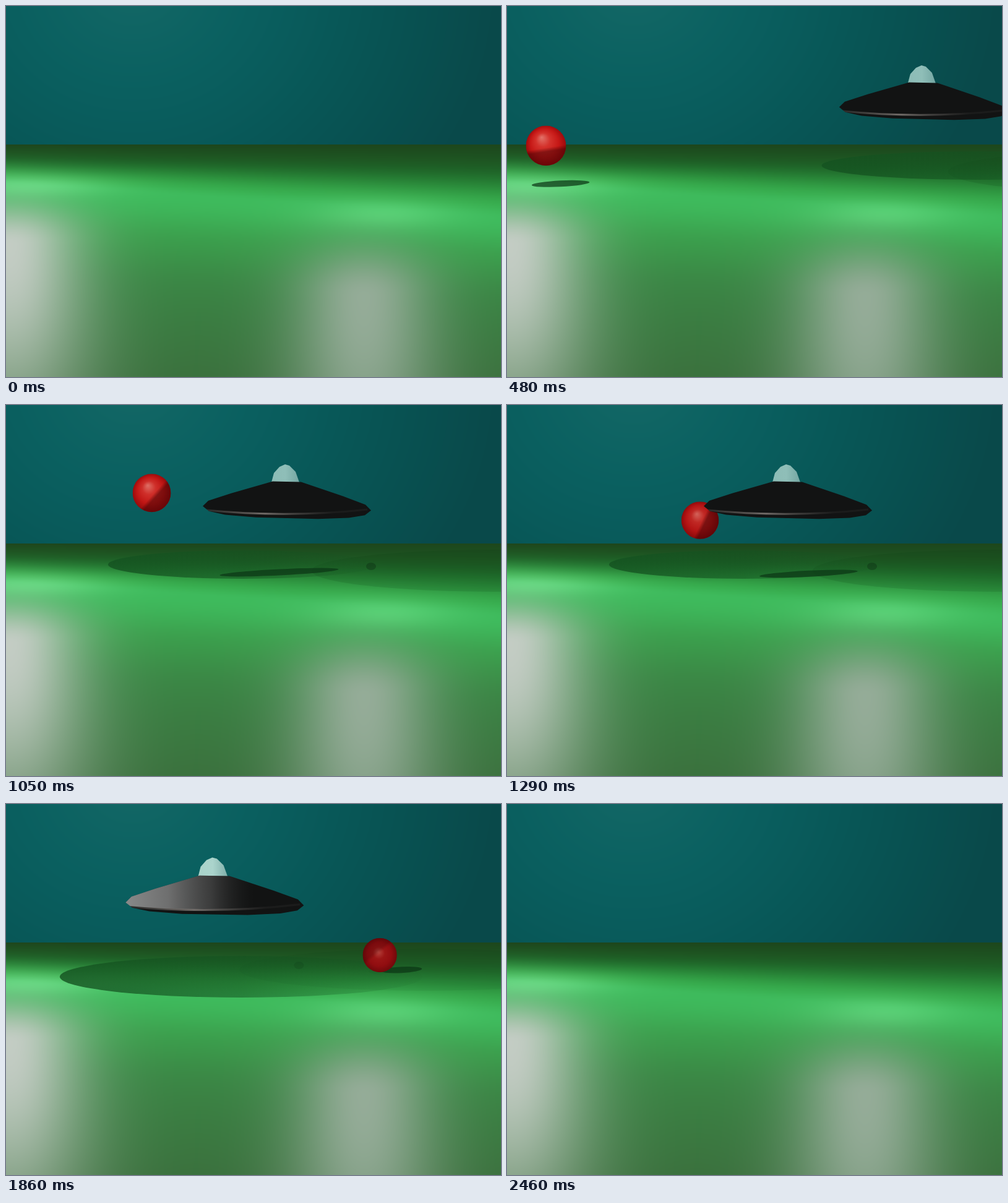
These frames come from a looping animation (800x600 px, 2550 ms). An HTML page with a canvas:

```html
<!DOCTYPE html>
<html lang="en">
<head>
<meta charset="utf-8">
<title>Saucer and ball</title>
<style>
html, body { margin: 0; width: 100%; height: 100%; overflow: hidden; background: #0a5f5f; }
canvas { display: block; width: 800px; height: 600px; }
</style>
</head>
<body>
<canvas id="stage" width="800" height="600"></canvas>
<script>
const W = 800, H = 600, HORIZON = 224;
const LOOP = 2550, FIRST_HOLD = 120, STEP = 30, LAST_FRAME = 79;
const ctx = document.getElementById('stage').getContext('2d');

const clamp = v => Math.max(0, Math.min(1, v));
const lerp = (a, b, t) => a + (b - a) * t;
const smooth = (a, b, v) => { const t = clamp((v - a) / (b - a)); return t * t * (3 - 2 * t); };
const bell = (v, mid, width) => Math.exp(-(((v - mid) / width) ** 2));

// Smooth curve through points [position, values...] that never overshoots
function sample(points, at) {
  const last = points.length - 1;
  let i = 0;
  while (i < last - 1 && at > points[i + 1][0]) i++;
  const a = points[i], b = points[i + 1], span = b[0] - a[0];
  const t = clamp((at - a[0]) / span), u = 1 - t;
  const rate = (k, c) => (points[k + 1][c] - points[k][c]) / (points[k + 1][0] - points[k][0]);
  const slope = (k, c) => {
    if (k === 0) return rate(0, c);
    if (k === last) return rate(k - 1, c);
    const p = rate(k - 1, c), q = rate(k, c);
    return p * q > 0 ? 2 * p * q / (p + q) : 0;
  };
  return a.slice(1).map((v, n) => {
    const c = n + 1;
    return v * (1 + 2 * t) * u * u + b[c] * t * t * (3 - 2 * t)
      + span * t * u * (slope(i, c) * u - slope(i + 1, c) * t);
  });
}

// Frame, x, height above the floor
const bounces = [
  [0, -70, 150], [13, 63, 49], [23, 164, 0], [35.5, 265, 156], [40, 312, 79],
  [45.5, 408, 4], [53, 533, 18], [66, 680, 0], [79, 835, 115]
];

function ballAt(frame) {
  const [x, height] = sample(bounces, frame);
  const r = 33 - 0.0088 * x, ground = 136 + 5 * r;
  const flip = 2 * smooth(41, 50, frame);
  return { x, y: ground - 0.72 * r - height, r, height, ground, angle: -0.15 - 0.036 * (frame - 13) - flip };
}

function saucerAt(frame) {
  const away = Math.max(0, frame - 51) / 15;
  const arriving = 480 * (1 - smooth(-1.4, 25.8, frame));
  const hit = bell(frame, 51, 3.5);
  return {
    x: 454 + arriving + 6 * hit - 319 * away ** 1.6,
    y: 168 - 2 * hit - 10 * away,
    turn: -0.25 * hit - 0.015 * clamp(away),
    scale: 1 + 0.11 * away,
    light: smooth(0, 1, away),
    shadow: {
      x: 382 + 1.72 * arriving - 42 * away ** 5,
      y: 258 + 40 * away,
      rx: 217 + 0.15 * arriving + 143 * away,
      ry: 23 + 20 * away
    }
  };
}

const skyColors = [[0, 20, 104, 102], [200, 10, 95, 95], [400, 8, 84, 84], [590, 9, 73, 74]];
const floorColors = [
  [0, 29, 70, 28], [0.3, 30, 93, 37], [0.8, 55, 172, 78], [1, 62, 186, 92],
  [1.25, 59, 157, 76], [1.5, 58, 133, 68], [2, 57, 112, 60]
];

function fog(x, y, cx, cy, spread, above, below) {
  const dy = y - cy;
  return 0.95 * bell(x, cx, spread + Math.max(0, dy) * 0.1) * bell(dy, 0, dy < 0 ? above : below);
}

function floorColor(x, y) {
  const ridge = 287 + 0.07 * x;
  const depth = y < ridge ? (y - HORIZON) / (ridge - HORIZON) : 1 + (y - ridge) / (H - ridge);
  const glow = 28 * (bell(x, 40, 130) * bell(y, 290, 18) + 0.8 * bell(x, 610, 110) * bell(y, 336, 25));
  const leftFog = fog(x, y, 5, 385, 118, 68, 300), rightFog = fog(x, y, 578, 470, 112, 82, 340);
  const leftGrey = [202, 207, 202], rightGrey = [153, 174, 156];
  return sample(floorColors, depth)
    .map((v, c) => lerp(lerp(v + glow, leftGrey[c], leftFog), rightGrey[c], rightFog));
}

function paintBackdrop() {
  const canvas = document.createElement('canvas');
  canvas.width = W;
  canvas.height = H;
  const c = canvas.getContext('2d'), image = c.createImageData(W, H);
  for (let y = 0, i = 0; y < H; y++) {
    for (let x = 0; x < W; x++, i += 4) {
      const rgb = y < HORIZON
        ? sample(skyColors, Math.hypot(x - 205, (y + 40) * 1.1))
        : floorColor(x, y);
      for (let k = 0; k < 3; k++) image.data[i + k] = rgb[k];
      image.data[i + 3] = 255;
    }
  }
  c.putImageData(image, 0, 0);
  return canvas;
}
const backdrop = paintBackdrop();

// Spreads the colours evenly along the gradient
function shade(gradient, ...colors) {
  colors.forEach((color, i) => gradient.addColorStop(i / (colors.length - 1), color));
  return gradient;
}
const mix = (a, b, t) => `rgb(${a.map((v, i) => Math.round(lerp(v, b[i], t)))})`;

function ellipse(x, y, rx, ry, fill, angle = 0) {
  ctx.beginPath();
  ctx.ellipse(x, y, rx, ry, angle, 0, Math.PI * 2);
  ctx.fillStyle = fill;
  ctx.fill();
}

function polygon(points, fill) {
  ctx.beginPath();
  points.forEach(([x, y]) => ctx.lineTo(x, y));
  ctx.closePath();
  ctx.fillStyle = fill;
  ctx.fill();
}

function drawShadows(ball, saucer, frame) {
  const { x, r, height, ground } = ball, s = saucer.shadow, dim = 1 - saucer.light;
  ctx.save();
  ctx.beginPath();
  ctx.rect(0, HORIZON, W, H - HORIZON);
  ctx.clip();
  ellipse(saucer.x + 340, 268, 300, 34, `rgba(12,60,20,${0.14 * dim})`);
  ellipse(s.x, s.y, s.rx, s.ry, shade(ctx.createLinearGradient(s.x - s.rx, 0, s.x + s.rx, 0),
    'rgba(20,82,32,0.82)', 'rgba(20,82,32,0.55)', 'rgba(20,82,32,0.04)'));
  ellipse(saucer.x + 136, 261, 8, 6, `rgba(10,35,15,${0.32 * dim * clamp(1 + saucer.turn * 4)})`);

  const stretch = smooth(50, 330, x);
  ellipse(x + 24 - 0.015 * x + 2 * height * stretch, ground - 5 - 0.12 * height,
    38 - 0.018 * x + height * (0.2 + 0.4 * stretch), 5, 'rgba(12,55,22,0.72)', -0.05);
  ellipse(x + 1, ground - 4, 0.68 * r, 0.18 * r, `rgba(10,45,20,${0.6 * bell(frame, 51, 5)})`);
  ctx.restore();
}

function drawBall({ x, y, r, ground, angle }, frame) {
  const far = smooth(25, 64, frame);
  const hx = x - r * lerp(0.22, 0.08, far), hy = y - r * lerp(0.42, 0.18, far);
  ctx.save();
  ctx.beginPath();
  ctx.rect(0, 0, W, ground);
  ctx.clip();
  ctx.beginPath();
  ctx.arc(x, y, r, 0, Math.PI * 2);
  ctx.clip();
  ctx.fillStyle = shade(ctx.createRadialGradient(hx, hy, 0, x, y, r * 1.05),
    mix([226, 115, 105], [180, 66, 60], far), mix([212, 50, 44], [152, 20, 20], far),
    mix([198, 24, 22], [142, 12, 16], far), mix([150, 8, 10], [105, 8, 10], far));
  ctx.fillRect(x - r, y - r, r * 2, r * 2);
  ctx.translate(x, y);
  ctx.rotate(angle);
  ctx.fillStyle = shade(ctx.createLinearGradient(0, r * 0.1, 0, r * 0.3), 'rgba(45,0,3,0)',
    `rgba(45,0,3,${0.45 * (1 - smooth(54, 64, frame))})`);
  ctx.fillRect(-r, 0, r * 2, r);
  ctx.restore();
}

const rim = [[23, -44], [90, -23], [127, -10], [136, -1], [126, 7], [100, 12], [50, 15]];
const hull = [...rim, ...rim.map(([x, y]) => [-x, y]).reverse()].map(([x, y]) => [x, y + 0.026 * x]);
const dome = [[-25, -43], [-21, -58], [-12, -68], [-3, -72], [4, -70], [14, -60], [20, -43]];

function drawSaucer({ x, y, turn, scale, light }) {
  ctx.save();
  ctx.translate(x, y);
  ctx.rotate(turn);
  ctx.scale(scale, scale);
  polygon(dome, shade(ctx.createLinearGradient(-25, 0, 20, 0),
    mix([140, 188, 182], [192, 230, 218], light), mix([143, 190, 184], [194, 230, 220], light),
    mix([116, 166, 162], [140, 185, 178], light)));
  polygon(hull, '#121313');
  ctx.clip();

  ctx.beginPath();
  ctx.moveTo(-140, -50);
  ctx.lineTo(-140, 0);
  ctx.quadraticCurveTo(0, 15, 140, 0);
  ctx.lineTo(140, -50);
  ctx.fillStyle = shade(ctx.createLinearGradient(-136, 0, 60, 0),
    `rgba(235,235,235,${light})`, `rgba(195,195,195,${light * 0.95})`,
    `rgba(125,125,125,${light * 0.7})`, 'rgba(50,50,50,0)');
  ctx.fill();

  const peak = -35 - turn * 340;
  ctx.beginPath();
  ctx.moveTo(-130, 2);
  ctx.quadraticCurveTo(0, 15, 130, 1);
  ctx.lineWidth = 3;
  ctx.strokeStyle = shade(ctx.createLinearGradient(peak - 110, 0, peak + 110, 0),
    'rgba(100,96,92,0.2)', 'rgba(128,122,118,0.85)', 'rgba(80,78,76,0.15)');
  ctx.stroke();
  ctx.restore();
}

function render(time) {
  const frame = time < FIRST_HOLD ? 0 : Math.min(LAST_FRAME, 1 + Math.floor((time - FIRST_HOLD) / STEP));
  ctx.drawImage(backdrop, 0, 0);
  if (frame === 0 || frame === LAST_FRAME) return;
  const ball = ballAt(frame), saucer = saucerAt(frame);
  drawShadows(ball, saucer, frame);
  drawBall(ball, frame);
  drawSaucer(saucer);
}

const start = performance.now();
function tick() {
  render((performance.now() - start) % LOOP);
  requestAnimationFrame(tick);
}
tick();
</script>
</body>
</html>
```
